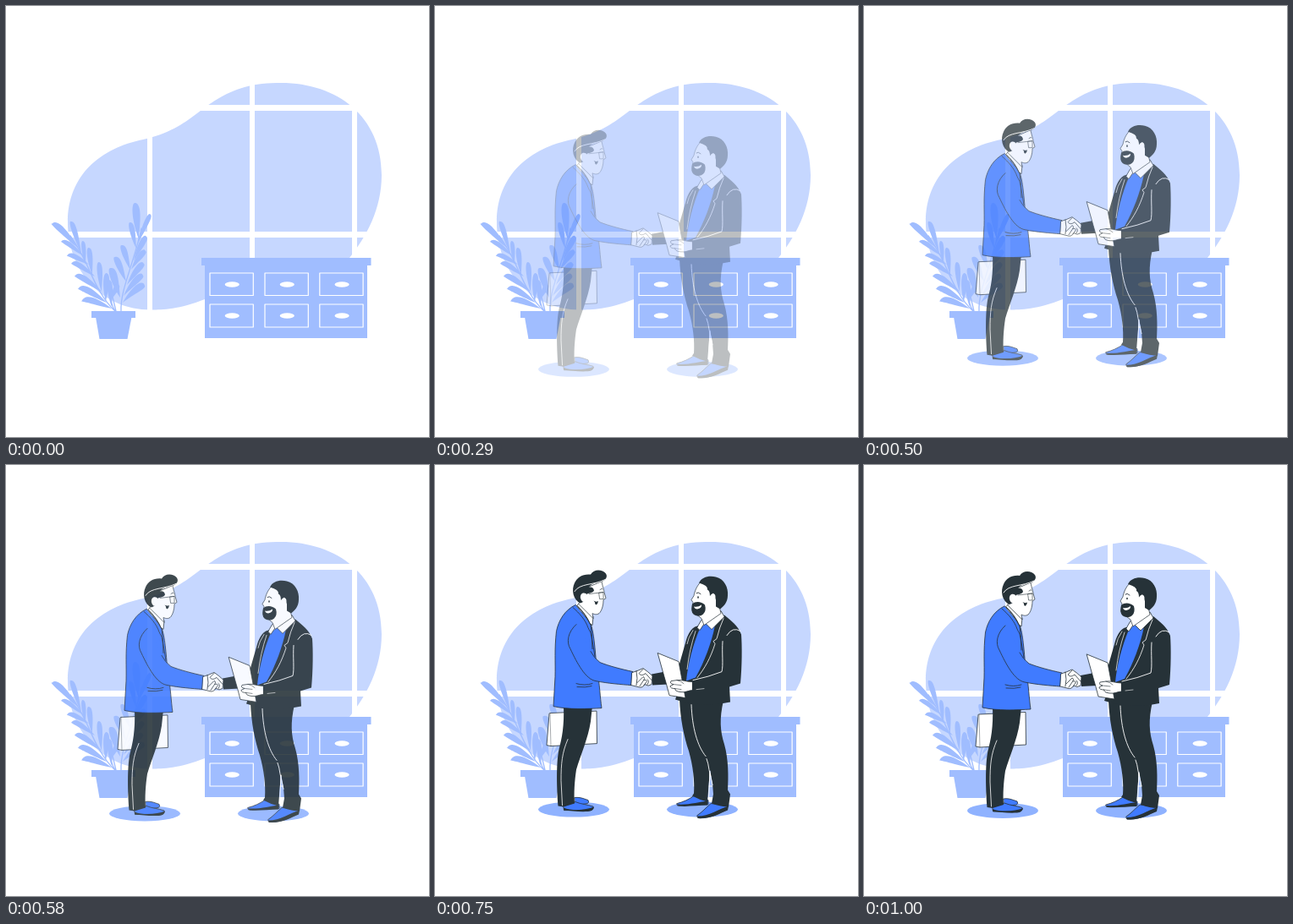
An HTML page with a canvas that plays this animation: 500 px wide and 510 px high, repeating every 1040 ms.

```html
<!DOCTYPE html>
<html lang="en">
<head>
<meta charset="utf-8">
<title>Office handshake</title>
<style>
html, body { margin: 0; width: 100%; height: 100%; overflow: hidden; background: #fff; }
canvas { display: block; width: 500px; height: 510px; }
</style>
</head>
<body>
<canvas id="stage"></canvas>
<script>
const W = 500, H = 510, LOOP = 1040, FPS = 24, RISE = 30;
const BLUE = '#407bff', PALE = '#c6d7ff', MID = '#a0bdff', SHADE = '#8fb2ff';
const INK = '#263238', WHITE = '#fff';
const dpr = window.devicePixelRatio || 1;

function layer(canvas) {
  canvas.width = W * dpr;
  canvas.height = H * dpr;
  const c = canvas.getContext('2d');
  c.scale(dpr, dpr);
  c.lineJoin = c.lineCap = 'round';
  return c;
}

const stage = layer(document.getElementById('stage'));
const room = layer(document.createElement('canvas'));
const people = layer(document.createElement('canvas'));
let g = room;

function shape(d, fill, line, width = 0.8) {
  const p = new Path2D(d);
  if (fill) {
    g.fillStyle = fill;
    g.fill(p);
  }
  if (line) {
    g.strokeStyle = line;
    g.lineWidth = width;
    g.stroke(p);
  }
}

const stroke = (d, color = INK, width = 0.8) => shape(d, null, color, width);

function box(x, y, w, h, fill) {
  g.fillStyle = fill;
  g.fillRect(x, y, w, h);
}

function oval(x, y, rx, ry, fill) {
  g.fillStyle = fill;
  g.beginPath();
  g.ellipse(x, y, rx, ry, 0, 0, Math.PI * 2);
  g.fill();
}

// Narrow at the base, round at the tip, arched upwards when it leans.
function leaf(bx, by, tx, ty, w) {
  const dx = tx - bx, dy = ty - by, len = Math.hypot(dx, dy);
  const nx = -dy / len * w, ny = dx / len * w, lift = Math.abs(dx) * 0.16;
  const at = (k, s) => [bx + dx * k + nx * s, by + dy * k + ny * s - lift];
  g.fillStyle = MID;
  g.beginPath();
  g.moveTo(bx, by);
  g.bezierCurveTo(...at(0.45, 0.5), ...at(0.92, 1.1), tx, ty);
  g.bezierCurveTo(...at(1.03, -0.7), ...at(0.6, -1), bx, by);
  g.fill();
}

function drawWindow() {
  shape('M73 256C73 200 112 168 162 158C222 145 230 111 282 96C295 92 310 91 325 91C392 91 444 131 444 200' +
    'C444 240 426 273 406 298C360 345 270 332 235 347C205 359 185 359.5 172 359.5C115 360 73 315 73 256Z', PALE);
  for (const x of [167, 288, 409]) box(x, 80, 6, 290, WHITE);
  for (const y of [117, 267]) box(60, y, 395, 7, WHITE);
}

function drawCabinet() {
  box(231, 298, 200.5, 9, MID);
  box(235, 307, 192, 86, MID);
  g.strokeStyle = WHITE;
  g.lineWidth = 1.2;
  for (const [y, h] of [[316, 26.5], [353, 27]]) {
    for (const x of [241, 306, 370.8]) {
      g.strokeRect(x, y, 51.3, h);
      oval(x + 26.3, y + 13.5, 8.6, 3.3, WHITE);
    }
  }
}

function drawPlant() {
  const left = [
    [86, 287, 54, 258, 6], [89, 292, 77, 255, 5], [92, 296, 65, 279, 4.5], [94, 306, 91, 278, 4],
    [98, 306, 72, 296, 4.5], [102, 318, 98, 286, 5], [105, 320, 77, 305, 5], [113, 338, 110, 303, 5],
    [113, 338, 81, 320, 5.5], [118, 350, 119, 316, 5.5], [119, 351, 85, 335, 6], [125, 358, 89, 350, 6]
  ];
  const right = [
    [157, 276, 153, 233, 7], [156, 281, 171, 247, 4.5], [154, 287, 147, 256, 5], [151, 302, 166, 273, 5.5],
    [147, 312, 137, 283, 5.5], [148, 312, 165, 290, 5.5], [142, 326, 129, 297, 6], [143, 330, 163, 305, 6],
    [135, 345, 124, 310, 7], [139, 343, 162, 319, 6], [138, 351, 164, 331, 6.5], [125, 356, 122, 324, 5],
    [124, 348, 133, 330, 5]
  ];
  for (const l of [...left, ...right]) leaf(...l);
  stroke('M129 361C112 346 102 320 95 305Q86 286 76 272', MID, 1.3);
  stroke('M136 361C135 335 151 306 160 263', MID, 1.3);
  stroke('M129 361Q123 352 124 340M130 361L124 336', MID, 1.3);
  box(101, 361, 52, 8, MID);
  shape('M106 368H148.500L143.500 394H110.500Z', MID);
}

function drawVisitor() {
  shape('M136 295L191 292.500L191.500 331L137 334L132 333L135 296Z', WHITE, INK);
  stroke('M136 295L137 334', INK, 0.4);

  // Shoes and trousers
  shape('M165 395C171 394 175 396 181 398Q183 401 180 402L166 404Z', BLUE, INK);
  shape('M152 405L166 400C173 403 180 403 187 405.500Q188 409 184 410L153 410Z', BLUE, INK);
  shape('M152 407C162 411 178 410 188 406Q187 411 181 411.500C170 412 161 411 152 410Z', INK);
  shape('M152 286C153 310 150 325 146.500 338C143 355 144 385 145.500 405L152 406L165 402' +
    'C164 390 165 375 167 362C172 345 181 325 184 305L186 286Z', INK);
  stroke('M157 326C150 342 149 355 149 375L150.500 404', WHITE);

  // Jacket
  shape('M166 167C153 173 146 186 143.500 198C141 220 142.500 235 142 252L140 287C158 291 180 290 197 289' +
    'C195 276 195 262 191 240C189 218 188 200 184 189Z', BLUE, INK);
  shape('M171 165L187 181L186 191L183 189C179 180 173 173 168 168Z', WHITE, INK);
  stroke('M163 170C171 177 178 185 181 194L184 200Q187 214 189 228');
  stroke('M168 168Q179 178 184 191Q186 204 186 219', INK, 0.9);
  shape('M167 190C157 199 155 211 160 219C168 236 178 255 190 257C205 260 220 261 232 262L234 246' +
    'C220 243 205 239 195 235C186 229 179 210 174 200Z', BLUE);
  stroke('M167 190C157 199 155 211 160 219C168 236 178 255 190 257C205 260 220 261 232 262L234 246' +
    'C220 243 205 239 195 235Q188 230 184 222');
  stroke('M167 260Q177 263 186 260M168 264Q178 265 185 263');

  // Head
  shape('M181 146L197 139C198 145 200 150 200 152L202 159L199 161C199 168 197 174 194 177' +
    'C191 179 188 178 186 177L187 183L170 166L172 155Z', WHITE, INK, 0.7);
  shape('M172 165C163 161 161 149 165 141C168 134 175 130 184 131C188 124 198 125 202 130' +
    'C205 135 200 139 195 140C188 141 184 143 182 146Q187 145 188 150C186 154 181 152 179 155L176 163Z', INK);
  shape('M179 154C175 151 171 154 172 159C173 163 176 165 179 162Z', WHITE);
  stroke('M165 151C171 141 187 144 201 137', WHITE, 0.9);
  stroke('M182 154L199 152M194 152.500L199 152L199 160L195 160Z', INK, 0.6);
  stroke('M195 149Q197 147 198 148', INK, 0.7);
  shape('M187.500 162Q190 164 193 162.500Q192.500 166 190.500 167Q188.500 166 189 164Z', INK);
}

function drawHost() {
  // Shoes and trousers
  shape('M286 402C294 400 300 397 306 393L323 398V403L287 404.500Z', BLUE, INK);
  shape('M286 403C300 404 312 400 323 399L322 404C310 404 300 406 288 405Z', INK);
  shape('M310 416C316 412 320 407 326 402L346 404Q345 410 339 412C330 416 323 420 311 419Z', BLUE, INK);
  shape('M310 417C325 417 334 409 347 405L346 410C336 414 328 420 311 419.500Z', INK);
  shape('M289 278C290 302 294 322 300 340C305 358 307 375 306 390L304 393Q313 398 322 400L325 362L328 378' +
    'L329 391L327 402Q338 406 347 406L349 391L346 386C347 370 347 350 342 332C337 316 336 302 341 280Z', INK);
  stroke('M303 285C304 312 310 334 320 346M321 349Q323 354 324 362L328 380', WHITE, 0.9);
  stroke('M325 364L323.500 396', WHITE, 1);

  // Jacket
  shape('M292 240L272 246L256 249L257 262L276 261L295 264Z', INK);
  shape('M310 192C302 194 298 204 296 212L288 240L290 262L284 279C302 285 325 287 349 282L348 264L361 260' +
    'C363 240 363 215 362 202C358 191 350 186 342 179L326 193Z', INK);
  shape('M313 195L320 189L331 191C327 212 318 235 308 253L297 257C299 236 305 214 313 195Z', BLUE);
  shape('M315 185L338 174L342 181L327 196L319 188L313 197L310 194Z', WHITE, INK);
  stroke('M308 198C303 213 300 227 298 243M305 197Q299 206 298 213', WHITE, 0.7);
  stroke('M341 183Q336 194 333 207L329 210L331 213C326 229 319 242 310 253', WHITE, 0.8);
  stroke('M340 210C339 224 341 238 339 246Q324 252 305 256M345 203Q352 192 361 198', WHITE, 0.9);
  stroke('M309 267L318 266', WHITE, 0.6);

  // Head
  shape('M314 140C309 145 307 151 306 156L303 161L305 164L304 174L315 183L318 191L338 177L334 160L326 142Z', WHITE, INK, 0.7);
  shape('M312 141C315 134 324 132 332 134C342 136 347 147 346 156C346 164 341 169 337 172L332 169' +
    'L332 161L329 153L325 157Q325 150 322 149Q323 144 312 141Z', INK);
  shape('M325 157C327 152 332 153 331.500 158C331 164 328 168 325 165Z', WHITE);
  shape('M304 166C308 162 315 163 319 167Q321 174 317 178C312 182 306 180 304 176Q302.500 172 304 166Z', INK);
  shape('M306 169Q311 170 315 167Q315.500 171 310 172Q307 172 306 169Z', WHITE);
  stroke('M309 153Q311 151 314 154', INK, 0.9);
  oval(311, 158, 0.8, 1.3, INK);

  // Paper and holding hand
  shape('M263.500 224L288 234L296 277L277 274Q274 262 271 252Z', WHITE, INK);
  shape('M304 258C297 258 291 255 286 256L279 257Q277 260 282 261L278 263Q278 266 284 266Q283 269 290 270' +
    'C296 271 300 268 304 268Z', WHITE, INK);
  stroke('M282 261L291 262M284 266L291 267M286 256Q291 257 294 260', INK, 0.6);
}

function drawHandshake() {
  shape('M233 247L239 245L246 242Q252 246 257 251L256 261Q252 264 248 261Q245 266 240 264L232 262Z', WHITE, INK);
  stroke('M238 245Q240 254 238 262M246 243L241 248Q244 252 249 248L256 256', INK, 0.8);
  stroke('M239 259L246 252Q249 253 246 257L242 263M247 256Q251 255 250 258L247 262M251 255Q254 257 251 261', INK, 0.8);
}

function bezier(x, x1, y1, x2, y2) {
  const axis = (u, a, b) => 3 * (1 - u) * (1 - u) * u * a + 3 * (1 - u) * u * u * b + u * u * u;
  let lo = 0, hi = 1;
  for (let i = 0; i < 30; i++) {
    const mid = (lo + hi) / 2;
    if (axis(mid, x1, x2) < x) lo = mid;
    else hi = mid;
  }
  return axis(hi, y1, y2);
}

function drawPeople(y) {
  g = people;
  g.clearRect(0, 0, W, H);
  g.save();
  g.translate(0, y);
  oval(164, 409, 42, 9, SHADE);
  oval(316, 409, 42, 9, SHADE);
  drawVisitor();
  drawHost();
  drawHandshake();
  g.restore();
}

function paint(time) {
  const step = Math.floor((time % LOOP + 4.99) * FPS / 1000);
  stage.globalAlpha = 1;
  stage.drawImage(room.canvas, 0, 0, W, H);
  if (step >= 3) {
    const k = bezier(Math.min(1, step / FPS), 0.36, -0.01, 0.5, 1.38);
    drawPeople(RISE * (1 - k));
    stage.globalAlpha = Math.max(0, Math.min(1, k));
    stage.drawImage(people.canvas, 0, 0, W, H);
  }
}

box(0, 0, W, H, WHITE);
drawWindow();
drawCabinet();
drawPlant();

const start = performance.now();
function tick() {
  paint(performance.now() - start);
  requestAnimationFrame(tick);
}
tick();
</script>
</body>
</html>
```
